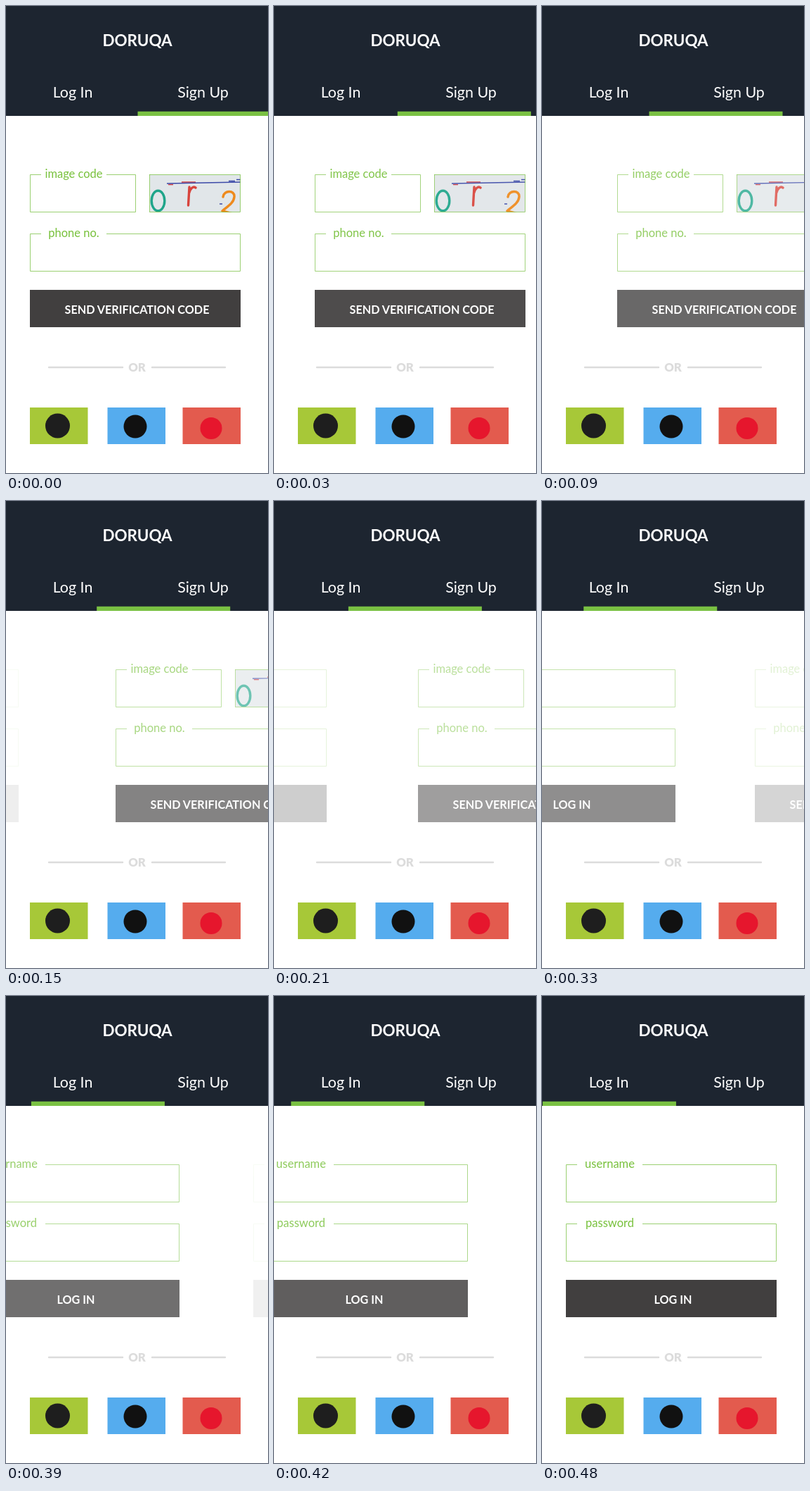
An HTML page that plays this animation: 373 by 663 pixels, repeating every 0.51 s.

```html
<!DOCTYPE html>
<html lang="en">
<head>
<meta charset="utf-8">
<style>
  html, body { margin: 0; width: 100%; height: 100%; overflow: hidden; background: #fff; }
  svg { display: block; }
  text { font-family: Lato, "Open Sans", sans-serif; text-anchor: middle; fill: #fff; }
  .title { font-size: 22.4px; font-weight: 700; }
  .tab { font-size: 21.4px; }
  .label { font-size: 16.5px; fill: #78c13c; }
  .action { font-size: 16.2px; font-weight: 700; }
  .or { font-size: 16.8px; font-weight: 900; fill: #dcdcdc; }
  .box { fill: none; stroke: #7ac143; stroke-width: .75; }
  .scrawl { fill: none; stroke-linecap: round; stroke-linejoin: round; stroke-width: 3.4; }
  .noise { fill: none; stroke-width: 1.4; }
</style>
</head>
<body>
<svg width="373" height="663" viewBox="0 0 373 663">
  <rect width="373" height="156" fill="#1d2530"/>
  <text class="title" x="187" y="57">DORUQA</text>
  <text class="tab" x="95" y="129.5">Log In</text>
  <text class="tab" x="280.5" y="129.5">Sign Up</text>
  <rect id="marker" y="149.7" width="190" height="6.3" fill="#7ac143"/>

  <g id="signUp">
    <path class="box" d="M50 239.5H34.5V292.5H184.5V239.5H143M50 323.5H34.5V376.5H333.5V323.5H143"/>
    <text class="label" x="96.5" y="243.5">image code</text>
    <text class="label" x="96.5" y="327.5">phone no.</text>
    <svg x="204" y="239" width="130" height="54">
      <rect x=".5" y=".5" width="129" height="53" fill="#e1e6e9"/>
      <ellipse class="scrawl" cx="12.5" cy="37.5" rx="9.3" ry="14.3" stroke="#1fa58a"/>
      <path class="scrawl" stroke="#d8443c" d="M57 18L55.500 44M56.500 27C58 20 63 16 66 19"/>
      <path class="scrawl" stroke="#ee8a1d" d="M105 32C106 22 122 22 121 32C120 42 109 47 104 52L119 56"/>
      <path class="noise" stroke="#d03a40" d="M27 14.500H34M46 11H66"/>
      <path class="noise" stroke="#3c4aa8" d="M25 13L130 11M113 9.500H122M124 7.500H130M100 42H104"/>
      <rect class="box" x=".5" y=".5" width="129" height="53"/>
    </svg>
    <rect x="34" y="403" width="300" height="53" fill="#413f3f"/>
    <text class="action" x="186.5" y="437">SEND VERIFICATION CODE</text>
  </g>

  <g id="logIn">
    <path class="box" d="M50 239.5H34.5V292.5H333.5V239.5H143M50 323.5H34.5V376.5H333.5V323.5H143"/>
    <text class="label" x="96.5" y="243.5">username</text>
    <text class="label" x="96.5" y="327.5">password</text>
    <rect x="34" y="403" width="300" height="53" fill="#413f3f"/>
    <text class="action" x="186.5" y="437">LOG IN</text>
  </g>

  <path d="M61 513H166M208 513H312" stroke="#dcdcdc" stroke-width="2.4" stroke-linecap="round"/>
  <text class="or" x="186.5" y="519">OR</text>

  <rect x="34" y="570" width="82.5" height="52" fill="#a7c838"/>
  <circle cx="73.5" cy="596" r="17.5" fill="#1e1e1e"/>
  <rect x="144.5" y="570" width="82.5" height="52" fill="#55acee"/>
  <circle cx="184" cy="597" r="16.5" fill="#111"/>
  <rect x="251.5" y="570" width="82.5" height="52" fill="#e35b4e"/>
  <circle cx="292" cy="599.5" r="15.5" fill="#e6162d"/>
</svg>
<script>
  const STEP = 30, LAST = 16;
  const byId = id => document.getElementById(id);
  const marker = byId("marker"), signUp = byId("signUp"), logIn = byId("logIn");

  // Whole-pixel offsets keep the thin outlines crisp.
  function place(form, x, opacity) {
    form.setAttribute("transform", `translate(${Math.floor(x)} 0)`);
    form.setAttribute("opacity", Math.min(1, Math.max(0, opacity)));
  }

  function draw() {
    const step = Math.floor(performance.now() / STEP) % (LAST + 1);
    marker.setAttribute("x", 187.5 - 11.66 * step);
    place(signUp, 24.5 * step, 1 - step / 14);
    place(logIn, 28.7 * (step - LAST), (step - 4) / 12);
    requestAnimationFrame(draw);
  }
  draw();
</script>
</body>
</html>
```
